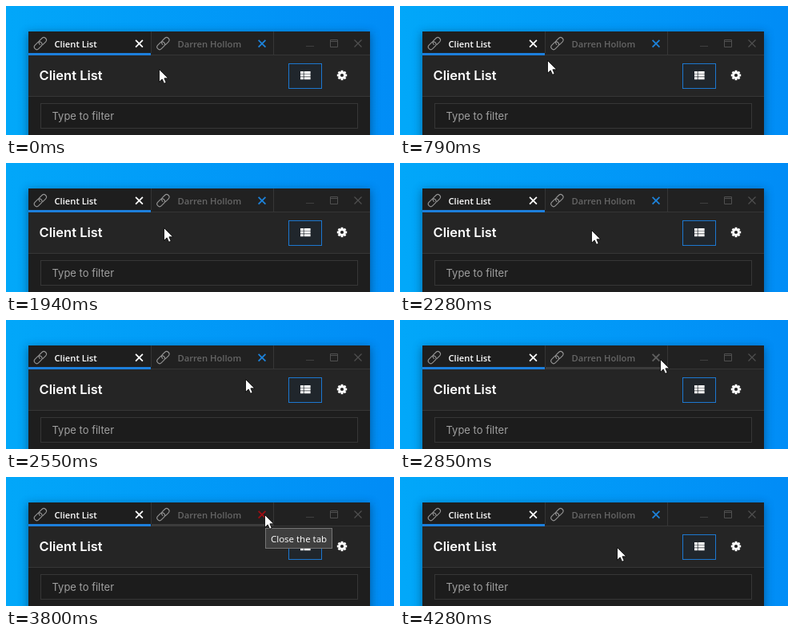
An HTML page that plays this animation: 485 px wide and 162 px high, repeating every 4940 ms.

```html
<!DOCTYPE html>
<html lang="en">
<head>
<meta charset="utf-8">
<title>Closing tabs</title>
<style>
html, body { margin: 0; width: 100%; height: 100%; overflow: hidden; background: #0094f8; }
svg { display: block; width: 485px; height: 162px; }
text { white-space: pre; }
.ui { font-family: "Open Sans", "Noto Sans", sans-serif; }
.tab { font-weight: 600; font-size: 11.2px; }
.page { font-family: Inter, sans-serif; }
</style>
</head>
<body>
<svg viewBox="0 0 485 162">
  <defs>
    <linearGradient id="sky" gradientUnits="userSpaceOnUse" x1="0" y1="110" x2="485" y2="30">
      <stop offset="0" stop-color="#02a8f9"/>
      <stop offset="1" stop-color="#018cf6"/>
    </linearGradient>
    <filter id="blur" x="-20%" y="-20%" width="140%" height="140%">
      <feGaussianBlur stdDeviation="6"/>
    </filter>
    <g id="link" fill="none" stroke="#959595" stroke-width="1.1" stroke-linecap="round" transform="rotate(-45)">
      <rect x="-9.5" y="-3.2" width="11" height="6.4" rx="3.2"/>
      <path d="M1 3.2H6A3.2 3.2 0 0 0 6 -3.2H1.8A3.2 3.2 0 0 0 -1.4 .6"/>
    </g>
    <path id="cross" d="M-4.4 -4.4L4.4 4.4M4.4 -4.4L-4.4 4.4" fill="none"/>
  </defs>

  <rect width="485" height="162" fill="url(#sky)"/>
  <rect x="27" y="34" width="429" height="150" fill="#002a50" opacity=".5" filter="url(#blur)"/>

  <!-- window -->
  <rect x="28" y="32" width="427" height="130" fill="#1e1e1e"/>
  <rect x="181" y="32" width="274" height="29" fill="#212121"/>
  <rect x="28" y="62" width="427" height="51" fill="#252525"/>
  <path d="M181 61.5H455M28 113.5H455M334.5 32V61M181.5 32V59" stroke="#363636"/>

  <!-- tabs -->
  <rect x="28" y="59" width="153" height="3" fill="#1d7fdc"/>
  <rect id="line2" x="182" y="59" width="152" height="3" fill="#3c3c3c"/>
  <use href="#link" x="43" y="47"/>
  <use href="#link" x="196.5" y="47"/>
  <g class="ui tab">
    <text x="60.5" y="52" fill="#fff">Client List</text>
    <text x="214.5" y="52" fill="#666">Darren Hollom</text>
  </g>
  <g stroke-width="1.8">
    <use id="x1" href="#cross" x="166.5" y="47.3"/>
    <use id="x2" href="#cross" x="320" y="47.3"/>
  </g>

  <!-- window buttons -->
  <g fill="none" stroke="#505050">
    <path d="M375 50.5H385" stroke="#404040"/>
    <path d="M405.5 42.5H414.5V51.5H405.5ZM405 44.5H415"/>
    <path d="M435.5 42.5L444.5 51.5M444.5 42.5L435.5 51.5" stroke-width="1.2"/>
  </g>

  <!-- page -->
  <g class="page">
    <text x="41.5" y="93" font-size="16.5" font-weight="600" fill="#fff">Client List</text>
    <rect x="43.5" y="122.5" width="396" height="31" fill="#1c1c1c" stroke="#363636"/>
    <text x="57.5" y="143" font-size="13" fill="#a0a0a0">Type to filter</text>
  </g>
  <rect x="353.5" y="72.5" width="41" height="31" fill="#20262c" stroke="#1c78d0"/>
  <g id="rows" fill="#fff"></g>
  <g transform="translate(420 87)" stroke="#fff" stroke-width="2.8">
    <circle r="3.5" fill="none"/>
    <g id="teeth"></g>
  </g>

  <g id="tip">
    <rect x=".5" y=".5" width="83" height="25" fill="#3f3f3f" stroke="#757575"/>
    <text class="ui" x="7" y="17.5" font-size="11.5" fill="#fff">Close the tab</text>
  </g>
  <path id="mouse" d="M.5 .5V16.3L4.2 12.9L6.6 18.3L9.2 17.2L6.9 11.8H11.7Z" fill="#fff" stroke="#000" stroke-width=".8"/>
</svg>
<script>
const LOOP = 4940;
const HOME = [191, 79];
// Pointer strokes: each bends towards a point on its way to the end.
const STROKES = [
  { from: 730, to: 970, bend: [176, 56], end: [165, 43] },
  { from: 1790, to: 1940, bend: [180, 65], end: [197, 81] },
  { from: 1940, to: 2310, bend: [219, 85], end: [243, 84] },
  { from: 2310, to: 2850, bend: [323, 78], end: [325, 49] },
  { from: 2850, to: 2910, bend: [324, 48], end: [323, 47] },
  { from: 3800, to: 4020, bend: [293, 80], end: [271, 88] }
];
const TIPS = [
  { from: 1230, to: 1820, x: 165, y: 60 },
  { from: 3140, to: 3830, x: 324, y: 64 }
];
const $ = id => document.getElementById(id);
const set = (id, key, value) => $(id).setAttribute(key, value);
const move = (id, x, y) => set(id, "transform", `translate(${x} ${y})`);
const show = (id, on) => set(id, "visibility", on ? "visible" : "hidden");
const repeat = (n, make) => Array.from({ length: n }, (_, i) => make(i)).join("");

$("teeth").innerHTML = repeat(8, i => `<path d="M0 -4.3V-6.2" transform="rotate(${i * 45})"/>`);
$("rows").innerHTML = repeat(3, i =>
  `<path d="M368 ${82 + i * 3.6}h3.8v3h-3.8zM372.6 ${82 + i * 3.6}h8v3h-8z"/>`);

function pointer(t) {
  let pos = HOME;
  for (const { from, to, bend, end } of STROKES) {
    if (t < from) break;
    const u = Math.min(1, (t - from) / (to - from)), v = 1 - u;
    pos = pos.map((p, i) => v * v * p + 2 * u * v * bend[i] + u * u * end[i]);
  }
  return pos.map(Math.round);
}

function draw(t) {
  const [x, y] = pointer(t);
  const over = (left, right, top, bottom) => x >= left && x <= right && y >= top && y <= bottom;
  const tab2 = over(181, 334, 32, 61);
  const red = "#9c0d12";
  move("mouse", x, y);
  set("x1", "stroke", over(157, 171, 38, 57) ? red : "#fff");
  set("x2", "stroke", over(310, 323, 38, 57) ? red : tab2 ? "#606060" : "#1d82da");
  show("line2", tab2);

  const tip = TIPS.find(p => t >= p.from && t < p.to);
  show("tip", tip);
  if (tip) move("tip", tip.x, tip.y);
}

const start = performance.now();
function tick() {
  draw((performance.now() - start) % LOOP);
  requestAnimationFrame(tick);
}
tick();
</script>
</body>
</html>
```
